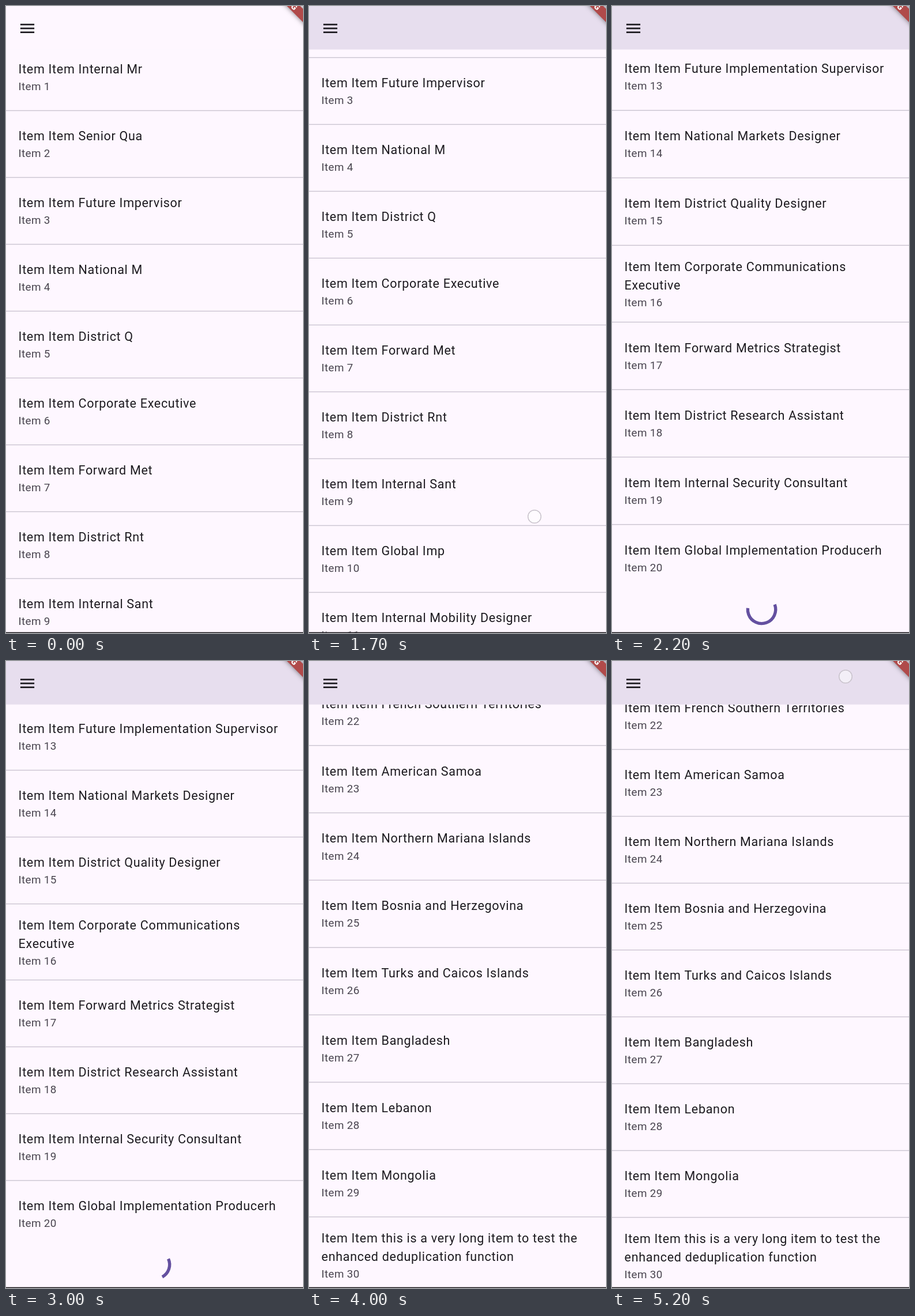
Animation of 515x1088 px, one loop 5.3 s. Source, as an HTML page with a canvas:

```html
<!DOCTYPE html>
<html lang="en">
<head>
<meta charset="utf-8">
<title>Endless list</title>
<style>
  html, body { margin: 0; width: 515px; height: 1088px; overflow: hidden; background: #fef7ff; }
  canvas { display: block; }
</style>
</head>
<body>
<canvas id="stage" width="515" height="1088"></canvas>
<script>
const c = document.getElementById('stage').getContext('2d');
const W = 515, BAR = 75.5, BOTTOM = 1086.6, ROW = 116, WRAP = 16;
const LOOP = 5300, STEP = 100, RAD = Math.PI / 180;

// "|" marks a wrapped line
const titles = [
  'Internal Mr', 'Senior Qua', 'Future Impervisor', 'National M', 'District Q',
  'Corporate Executive', 'Forward Met', 'District Rnt', 'Internal Sant', 'Global Imp',
  'Internal Mobility Designer', 'Senior Quality Manager', 'Future Implementation Supervisor',
  'National Markets Designer', 'District Quality Designer', 'Corporate Communications|Executive',
  'Forward Metrics Strategist', 'District Research Assistant', 'Internal Security Consultant',
  'Global Implementation Producerh',
  'Virgin Islands, U.S.', 'French Southern Territories', 'American Samoa',
  'Northern Mariana Islands', 'Bosnia and Herzegovina', 'Turks and Caicos Islands',
  'Bangladesh', 'Lebanon', 'Mongolia',
  'this is a very long item to test the|enhanced deduplication function'
];

let rowTop = 65.5;
const rows = titles.map((title, i) => {
  const lines = ('Item Item ' + title).split('|');
  const row = { lines, sub: 'Item ' + (i + 1), y: rowTop };
  rowTop += ROW + (lines.length - 1) * WRAP;
  return row;
});

// [time, scroll offset]
const scrollKeys = [
  [100, 0], [200, 170], [300, 208],
  [1700, 208], [1800, 500], [1900, 1190], [2000, 1384],
  [3500, 1384], [3600, 1690], [3700, 2372], [3800, 2480]
];
// [time, x, y, opacity]
const swipe = [[0, 391, 886, 1], [100, 397, 700, 1], [200, 402, 556, 0.5]];
const tap = [[4800, 400, 36, 0.5], [4900, 400, 33, 0.8], [5000, 400, 30, 1], [5100, 400, 30, 1], [5200, 405, 27, 1]];

function at(keys, t) {
  const i = keys.findIndex(k => k[0] >= t);
  if (i < 0) return keys[keys.length - 1].slice(1);
  if (i === 0) return keys[0].slice(1);
  const a = keys[i - 1], b = keys[i], f = (t - a[0]) / (b[0] - a[0]);
  return a.slice(1).map((v, j) => v + (b[j + 1] - v) * f);
}

// Overscroll stretch that relaxes after each fling reaches the end
function stretch(t) {
  for (const [start, size] of [[300, 0.015], [2000, 0.0253], [3800, 0.02]]) {
    const dt = t - start;
    if (dt >= 0 && dt < 600) return 1 + size * Math.exp(-dt / 200);
  }
  return 1;
}

// cubic-bezier(.4, 0, .2, 1)
function ease(x) {
  if (x <= 0) return 0;
  if (x >= 1) return 1;
  let lo = 0, hi = 1;
  for (let i = 0; i < 20; i++) {
    const s = (lo + hi) / 2, r = 1 - s;
    if (1.2 * s * r * r + 0.6 * s * s * r + s * s * s < x) lo = s; else hi = s;
  }
  return lo * lo * (3 - 2 * lo);
}

function text(str, y, size, spacing, color) {
  c.font = size + 'px Roboto, sans-serif';
  c.letterSpacing = spacing + 'px';
  c.fillStyle = color;
  c.fillText(str, 21.6, y);
}

function drawRow(row, y, divided) {
  const wrapped = row.lines.length > 1;
  row.lines.forEach((line, i) => text(line, y + (wrapped ? 44.3 : 51.5) + i * 31.8, 21.57, 0.67, '#1d1b20'));
  text(row.sub, y + (wrapped ? 105 : 80.5), 18.87, 0.34, '#49454f');
  if (divided) {
    c.fillStyle = '#cac4d0';
    c.fillRect(0, y - 0.7, W, 1.4);
  }
}

function drawSpinner(t, y) {
  const turns = 0.245 + 0.473 * (t - 2200) / 800, u = turns - Math.floor(turns);
  const head = ease(u * 2), tail = ease(u * 2 - 1);
  const start = tail * 270 + t / 2222 * 360 + turns * 90 - 39;
  c.strokeStyle = '#6450a0';
  c.lineWidth = 5.4;
  c.beginPath();
  c.arc(259.5, y, 24.2, start * RAD, (start + Math.max(1, (head - tail) * 270)) * RAD);
  c.stroke();
}

function drawList(t) {
  const [offset] = at(scrollKeys, t);
  const count = t < 1200 ? 10 : t < 3200 ? 20 : 30;
  c.save();
  c.beginPath();
  c.rect(0, BAR, W, BOTTOM - BAR);
  c.clip();
  c.translate(0, BOTTOM);
  c.scale(1, stretch(t));
  c.translate(0, -BOTTOM);
  rows.slice(0, count).forEach((row, i) => {
    const y = row.y - offset;
    if (y > -ROW && y < 1100) drawRow(row, y, i > 0);
  });
  if (count === 10) drawSpinner(t + 1600, 208 + 1047.5 - offset);
  if (count === 20) drawSpinner(t, 1384 + 1047.5 - offset);
  c.restore();
  return offset;
}

function drawBar(scrolled) {
  c.fillStyle = scrolled ? '#e7deee' : '#fef7ff';
  c.fillRect(0, 0, W, BAR);
  c.fillStyle = '#1d1b20';
  for (const y of [30.8, 37.5, 44.3]) c.fillRect(24.9, y, 24.2, 2.7);

  // Corner ribbon
  c.save();
  c.translate(498.5, 0);
  c.rotate(45 * RAD);
  c.shadowColor = 'rgba(0,0,0,.5)';
  c.shadowBlur = 8;
  c.fillStyle = '#b04a4a';
  c.fillRect(-40, -8.1, 100, 16.2);
  c.shadowColor = 'transparent';
  c.fillStyle = '#fff';
  c.font = '900 13.7px Roboto, sans-serif';
  c.letterSpacing = '0px';
  c.textAlign = 'right';
  c.fillText('DEBUG', 6.5, 4.9);
  c.restore();
}

function drawTouch(t) {
  let touch = t >= 4800 ? at(tap, t) : null;
  for (const start of [100, 1700, 3500])
    if (t >= start && t <= start + 200) touch = at(swipe, t - start);
  if (!touch) return;
  const [x, y, alpha] = touch;
  c.save();
  c.globalAlpha = alpha;
  c.beginPath();
  c.arc(x, y, 11.3, 0, 7);
  c.fillStyle = 'rgba(255,255,255,.5)';
  c.fill();
  c.strokeStyle = '#c9c3cc';
  c.lineWidth = 1.5;
  c.stroke();
  c.restore();
}

function draw(now) {
  const t = Math.floor(now % LOOP / STEP) * STEP;
  c.fillStyle = '#fef7ff';
  c.fillRect(0, 0, W, 1088);
  const offset = drawList(t);
  drawBar(offset > 0);
  drawTouch(t);
  c.fillStyle = '#151317';
  c.fillRect(0, BOTTOM, W, 2);
}

const begin = performance.now();
function frame() {
  draw(performance.now() - begin);
  requestAnimationFrame(frame);
}
frame();
</script>
</body>
</html>
```
